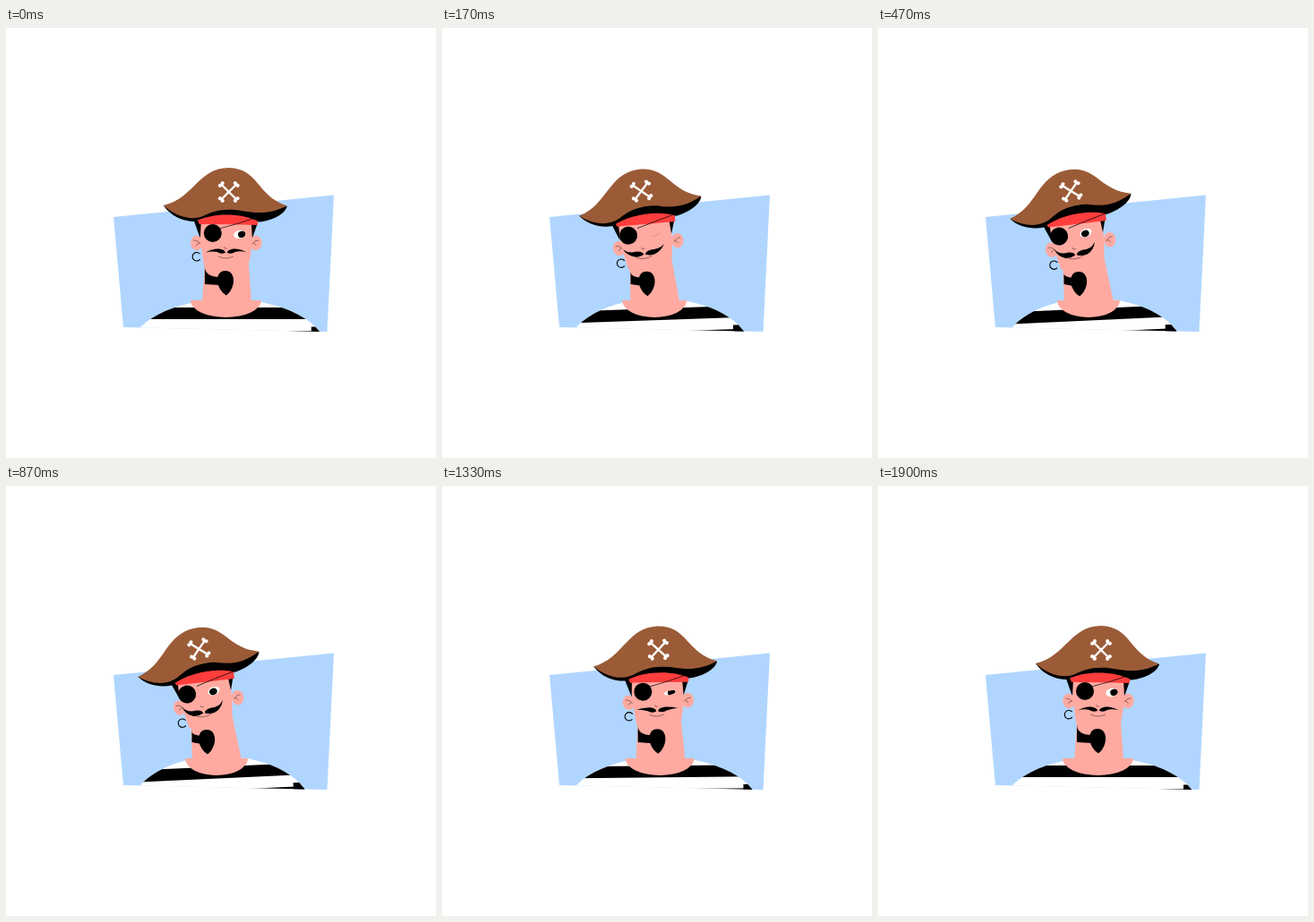
Animation of 480 by 480 pixels, one loop 2.2 s. Source, as an HTML page with a canvas:

```html
<!DOCTYPE html>
<html lang="en">
<head>
<meta charset="utf-8">
<title>Pirate</title>
<style>
html, body { margin: 0; width: 100%; height: 100%; overflow: hidden; background: #fff; }
canvas { display: block; width: 480px; height: 480px; }
</style>
</head>
<body>
<canvas id="stage" width="480" height="480"></canvas>
<script>
const ctx = document.getElementById('stage').getContext('2d');
const LOOP = 2200, HALF = 1100, MOVE = 530;
const SKIN = '#ffaaa1', INK = '#000', WHITE = '#fff', RED = '#ff3d3d';
const BROWN = '#9b5b37', SKY = '#b0d6ff', LINE = '#70443f';
const clamp = v => Math.max(0, Math.min(1, v));
let turn = 0; // 0 = upright, 1 = tilted to the left

const mix = (a, b) => a + (b - a) * turn;

// Draws a part in its own space; it travels from (x0, y0) to (x1, y1) and tilts as it goes
function part(x0, y0, x1, y1, tilt, draw) {
  ctx.save();
  ctx.translate(mix(x0, x1), mix(y0, y1));
  ctx.rotate(tilt * turn);
  draw();
  ctx.restore();
}

function fill(color, trace) {
  ctx.beginPath();
  trace();
  ctx.fillStyle = color;
  ctx.fill();
}

function oval(color, x, y, rx, ry, rot = 0) {
  fill(color, () => ctx.ellipse(x, y, rx, ry, rot, 0, Math.PI * 2));
}

function poly(color, ...points) {
  fill(color, () => points.forEach(([x, y]) => ctx.lineTo(x, y)));
}

function thread(x0, y0, cx, cy, x1, y1, color = LINE, width = 0.7) {
  ctx.beginPath();
  ctx.moveTo(x0, y0);
  ctx.quadraticCurveTo(cx, cy, x1, y1);
  ctx.strokeStyle = color;
  ctx.lineWidth = width;
  ctx.stroke();
}

function drawBody() {
  ctx.save();
  poly(SKY, [120, 211], [366, 186.5], [358.5, 339], [131, 334]);
  ctx.clip();
  oval(WHITE, mix(248, 240), mix(360, 359), mix(110, 100), 57);
  ctx.clip();
  part(246, 318, 235, 319.5, -0.045, () => {
    ctx.fillStyle = INK;
    ctx.fillRect(-130, -6, 260, 13);
    ctx.fillRect(-130, 20, 260, 13);
    ctx.fillRect(mix(95, 85), 15.5, 40, 13);
  });
  ctx.restore();
  fill(SKIN, () => ctx.ellipse(mix(245.5, 235), 304, mix(39.5, 35), 19, 0, 0, Math.PI));
  poly(SKIN, [mix(222, 206.5), mix(266, 268)], [mix(271, 252), mix(262, 254)],
    [mix(274, 263), 306], [mix(219, 208), 306]);
}

function drawEar(side) {
  ctx.save();
  ctx.translate(side * 33 + 2 * turn, mix(5, 9.5));
  ctx.scale(side, 1);
  oval(SKIN, 0, 0, 6.7, 8.2, 0.1);
  thread(3.5, -3, -2, -3, -4, 1);
  thread(0.5, 3, -1, 0, -3, 0);
  ctx.restore();
}

function drawWing(side) {
  ctx.save();
  ctx.scale(side, 1);
  fill(INK, () => {
    ctx.moveTo(23, mix(1.5, -9));
    ctx.quadraticCurveTo(mix(15, 18), mix(-3, -1), 8, -2.5);
    ctx.quadraticCurveTo(1, -1.5, 1, 2);
    ctx.quadraticCurveTo(mix(6, 8), mix(4, 5), mix(10, 13), mix(1, 3));
    ctx.quadraticCurveTo(mix(16, 21), -0.5, 23, mix(1.5, -9));
  });
  ctx.restore();
}

function drawEye(open) {
  ctx.save();
  ctx.translate(15, -4.5 + (1 - open) * 1.5);
  ctx.rotate(-0.2);
  if (open > 0.05) {
    oval(WHITE, 0, 0, 6.8, 4.5 * open);
    ctx.clip();
    oval(INK, mix(2.6, -0.8), 0.4, 4.4, 3.7);
  } else {
    thread(-6, 1, 0, 2, 6, 0, '#c9827b', 0.5);
  }
  ctx.restore();
}

function drawHead(open) {
  fill(SKIN, () => {
    ctx.moveTo(-30, -22);
    ctx.lineTo(30, -22);
    ctx.quadraticCurveTo(30, 10, 25, 29);
    ctx.quadraticCurveTo(0, 45, -24, 33);
    ctx.quadraticCurveTo(-28, 15, -30, -22);
  });
  for (const side of [-1, 1]) {
    poly(INK, [side * 36, -20], [side * 28, -20], [side * 29, 0]);
    drawEar(side);
  }
  fill(RED, () => {
    ctx.moveTo(-34, -26);
    ctx.lineTo(-30, -16);
    ctx.quadraticCurveTo(0, mix(-16, -14), 35, mix(-15, -12));
    ctx.lineTo(36, -28);
  });
  thread(-8, -11, 13, -16, 35, mix(-24, -20), INK);

  // features slide across the face as the head turns
  ctx.translate(-5 * turn, 2 * turn);
  oval(INK, -15, -6, 10, 10);
  drawEye(open);
  thread(-2, 9, -3, 12, 1, 11);
  thread(-9, 20, 0, 24, 8, 20);
  ctx.translate(0, mix(14, 16));
  drawWing(-1);
  drawWing(1);
}

function drawBeard() {
  const x = mix(245, 224), y = mix(282, 283), edge = mix(222, 207.5);
  fill(INK, () => {
    ctx.moveTo(edge, mix(266, 274));
    ctx.quadraticCurveTo(edge, 278, x - 6, y - 4);
    ctx.lineTo(x - 6, y + 5);
    ctx.lineTo(edge, 286);
  });
  fill(INK, () => {
    ctx.moveTo(x + 1, y + 16.5);
    ctx.bezierCurveTo(x - 12, y + 8, x - 12, y - 11, x, y - 11);
    ctx.bezierCurveTo(x + 12, y - 11, x + 12, y + 8, x + 1, y + 16.5);
  });
}

function drawEarring(swing) {
  ctx.rotate(swing);
  ctx.beginPath();
  ctx.arc(0, 4.7, 4.7, 0.6, Math.PI * 2 - 0.7);
  ctx.strokeStyle = INK;
  ctx.lineWidth = 1.1;
  ctx.stroke();
}

function drawHat() {
  const brim = mix(5, 1);
  ctx.scale(1, mix(1, 0.95));
  fill(INK, () => {
    ctx.moveTo(-69, -1);
    ctx.bezierCurveTo(-61, 11, -47, 17, -34, 17);
    ctx.bezierCurveTo(-14, 7, 18, 7, 38, 17.5);
    ctx.bezierCurveTo(51, 16, 66, 10, 69, 0);
  });
  fill(BROWN, () => {
    ctx.moveTo(-69, -1);
    ctx.bezierCurveTo(-35, -9, -30, -43, 4, -43);
    ctx.bezierCurveTo(38, -42, 35, -11, 69, -0.5);
    ctx.bezierCurveTo(50, 9, 35, 8, 18, brim);
    ctx.bezierCurveTo(0, brim - 3, -13, brim, -25, mix(11, 9));
    ctx.bezierCurveTo(-40, 17, -57, 10, -69, -1);
  });

  // crossed bones
  ctx.translate(4, mix(-16, -18));
  ctx.rotate(Math.PI / 4);
  for (let i = 0; i < 4; i++) {
    ctx.rotate(Math.PI / 2);
    ctx.fillStyle = WHITE;
    ctx.fillRect(0, -1.2, 12, 2.4);
    oval(WHITE, 12, -1.9, 2.1, 2.1);
    oval(WHITE, 12, 1.9, 2.1, 2.1);
  }
}

function render(ms) {
  const local = ms % HALF, back = ms >= HALF;
  const left = Math.pow(1 - clamp(local / MOVE), back ? 2.6 : 4);
  turn = back ? left : 1 - left;
  const open = clamp((Math.abs(local - 170) - 20) / 80);
  const fade = clamp(((back ? 800 : 1070) - local) / 400);
  const swing = (back ? -0.3 : 0.3) * fade * Math.exp(-local / 400) * Math.sin(local / 60);

  const dpr = window.devicePixelRatio || 1, size = Math.round(480 * dpr);
  if (ctx.canvas.width !== size) ctx.canvas.width = ctx.canvas.height = size;
  ctx.setTransform(dpr, 0, 0, dpr, 0, 0);
  ctx.fillStyle = WHITE;
  ctx.fillRect(0, 0, 480, 480);
  drawBody();
  part(246, 235, 222.5, 233, -0.175, () => drawHead(open));
  drawBeard();
  part(213, 250.5, 197, 260, 0, () => drawEarring(swing));
  part(245, 199, 215, 199.5, -0.21, drawHat);
}

const start = performance.now();
function tick() {
  render((performance.now() - start) % LOOP);
  requestAnimationFrame(tick);
}
tick();
</script>
</body>
</html>
```
